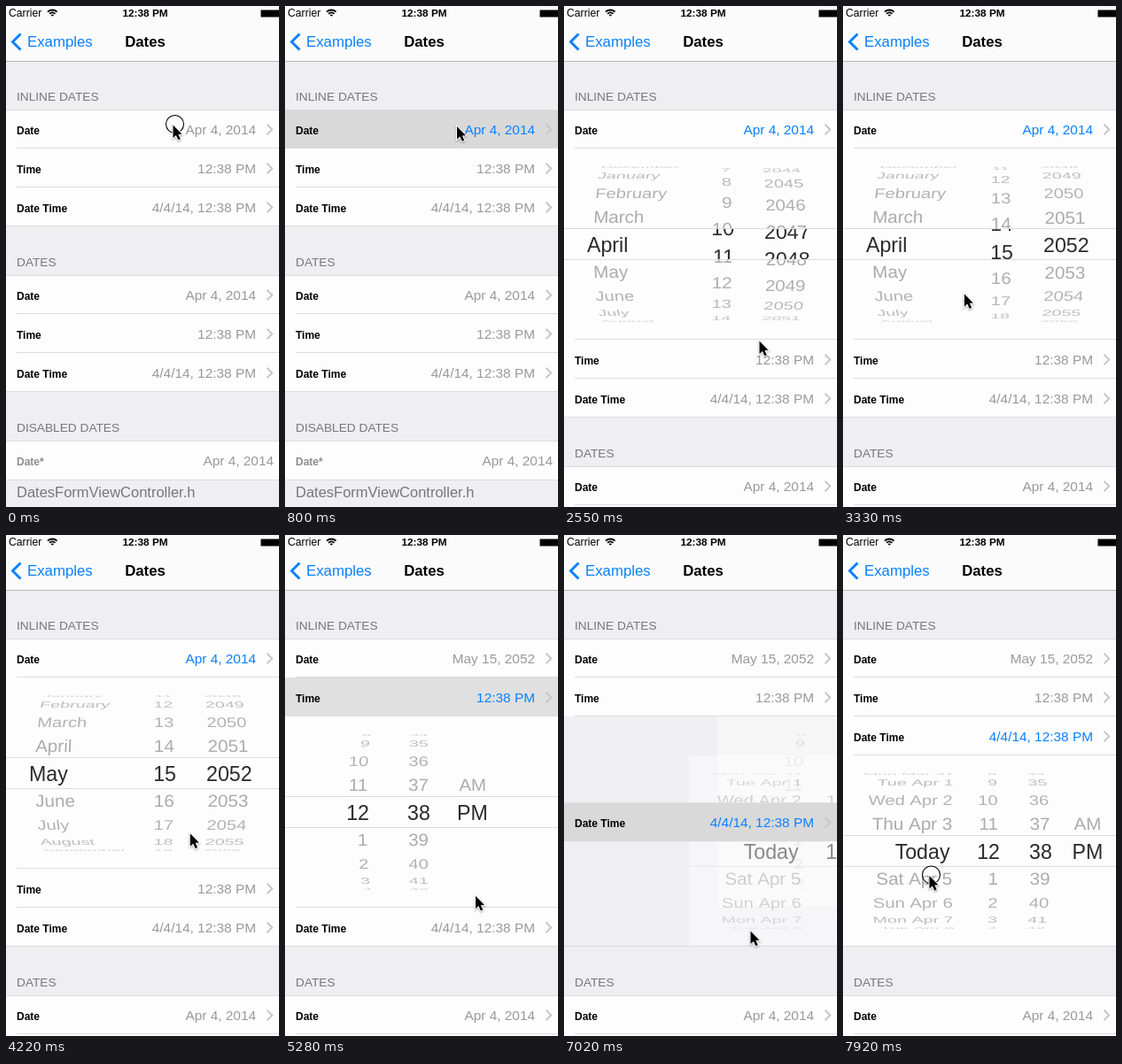
Recreate the animation shown at these times as an HTML page with a canvas. Size 308x566 px, loop 8 s.

```html
<!DOCTYPE html>
<html lang="en">
<head>
<meta charset="utf-8">
<title>Dates</title>
<style>
  html, body { margin: 0; width: 100%; height: 100%; overflow: hidden; background: #efeff2; }
  canvas { display: block; }
</style>
</head>
<body>
<canvas id="stage" width="308" height="566"></canvas>
<script>
const ctx = document.getElementById('stage').getContext('2d');
const LOOP = 8000, W = 308, H = 566, MID = 157, SCREEN = 320, LEFT = -3;
const BLUE = '#0a80ff', GREY = '#999', LINE = '#dcdcde', CELL = '#fdfdfd', BACK = '#efeff2';
const ROW = 44, PICKER = 216, TOP = 117, SECTION = 187;

const clamp = v => Math.max(0, Math.min(1, v));
const part = (t, from, to) => clamp((t - from) / (to - from));
const smooth = q => q * q * (3 - 2 * q);
const glide = q => 1 - (1 - q) ** 3;
const mix = (a, b, q) => a + (b - a) * q;
const wrap = (n, size) => (n % size + size) % size;

function text(str, x, y, size, color, align = 'left', weight = '') {
  ctx.font = `${weight} ${size}px "Liberation Sans", Arial, sans-serif`;
  ctx.textAlign = align;
  ctx.fillStyle = color;
  ctx.fillText(str, x, y);
}

function box(x, y, w, h, color) {
  ctx.fillStyle = color;
  ctx.fillRect(x, y, w, h);
}

// An angle bracket with its tip at x, y; a negative size points left
function chevron(x, y, size, color, width) {
  ctx.beginPath();
  ctx.moveTo(x - size, y - Math.abs(size));
  ctx.lineTo(x, y);
  ctx.lineTo(x - size, y + Math.abs(size));
  ctx.strokeStyle = color;
  ctx.lineWidth = width;
  ctx.stroke();
}

// Labels of the wheel rows
const MONTHS = ['January', 'February', 'March', 'April', 'May', 'June', 'July',
  'August', 'September', 'October', 'November', 'December'];
const WEEKDAYS = ['Mon', 'Tue', 'Wed', 'Thu', 'Fri', 'Sat', 'Sun'];
const month = n => MONTHS[wrap(n, 12)];
const date = n => wrap(n - 1, 31) + 1;
const year = n => n;
const hour = n => wrap(n - 1, 12) + 1;
const minute = n => String(wrap(n, 60)).padStart(2, '0');
const half = n => ['AM', 'PM'][n];
const day = n => n === 4 ? 'Today'
  : WEEKDAYS[wrap(n, 7)] + (n > 0 ? ` Apr ${n}` : ` Mar ${31 + n}`);

// A column holds its value, or spins by some rows between two times
const still = value => () => value;
const spin = (value, rows, from, to) => t => value + rows * glide(part(t, from, to));
const column = (label, align, x, chosenX, value) => ({ label, align, x, chosenX, value });
const PICKERS = [
  [
    column(month, 'left', 32.5, 26, spin(3, 1, 3520, 3950)),
    column(date, 'right', 190, 192, spin(4, 11, 2100, 3820)),
    column(year, 'left', 228, 226, spin(2014, 38, 1590, 3480))
  ],
  [
    column(hour, 'right', 93, 95, still(12)),
    column(minute, 'left', 139, 138, still(38)),
    column(half, 'left', 196.5, 194, still(1))
  ],
  [
    column(day, 'right', 123, 120.5, still(4)),
    column(hour, 'right', 175, 177, still(12)),
    column(minute, 'left', 211, 210, still(38)),
    column(half, 'left', 261, 258.5, still(1))
  ]
];

// Rows lie on a cylinder seen in weak perspective; the middle band magnifies them
const RADIUS = 88, STEP = 0.36, DEPTH = 950, BAND = 17;

function wheelRow(str, c, a, cy, chosen) {
  const cos = Math.cos(a), sin = Math.sin(a);
  const scale = 1 / (1 + RADIUS * (1 - cos) / DEPTH);
  const dx = (chosen ? c.chosenX : c.x) - MID;
  const size = chosen ? 23.2 : 20.7;
  const color = chosen ? '#2b2b2b' : `rgba(0,0,0,${0.18 + 0.15 * cos})`;
  ctx.save();
  ctx.transform(scale, 0, -dx * sin / DEPTH, cos, MID + dx * scale, cy + RADIUS * sin);
  text(str, 0, size * 0.37, size, color, c.align);
  ctx.restore();
}

function wheels(columns, cy, t, chosen) {
  ctx.save();
  ctx.beginPath();
  if (chosen) ctx.rect(LEFT, cy - BAND, SCREEN, 2 * BAND);
  else for (const y of [cy - RADIUS, cy + BAND]) ctx.rect(LEFT, y, SCREEN, RADIUS - BAND);
  ctx.clip();
  for (const c of columns) {
    const value = c.value(t), near = Math.round(value);
    for (let n = near - 4; n <= near + 4; n++) {
      const a = (n - value) * STEP, str = c.label(n);
      if (str !== undefined && Math.abs(a) < 1.5) wheelRow(str, c, a, cy, chosen);
    }
  }
  ctx.restore();
}

function picker(index, shown, t) {
  if (index < 0 || shown <= 0) return;
  const y = TOP + ROW * (index + 1), cy = y + PICKER / 2;
  ctx.save();
  ctx.globalAlpha = shown;
  ctx.translate(SCREEN * (1 - shown), 0);
  box(LEFT, y, SCREEN, PICKER, CELL);
  wheels(PICKERS[index], cy, t, false);
  wheels(PICKERS[index], cy, t, true);
  box(LEFT, cy - BAND - 1, SCREEN, 1, LINE);
  box(LEFT, cy + BAND, SCREEN, 1, LINE);
  box(12, y + PICKER - 1, SCREEN, 1, LINE);
  ctx.restore();
}

function row(y, label, value, color, glow = 0) {
  box(0, y, W, ROW, CELL);
  box(0, y, W, ROW, `rgba(217,217,217,${glow})`);
  box(12, y + ROW - 1, W, 1, LINE);
  text(label, 12, y + 28, 12, '#000', 'left', 'bold');
  text(value, 282, y + 28, 15.4, color, 'right');
  chevron(300.2, y + 22.5, 5.7, '#c7c7cc', 2);
}

function header(str, y) {
  text(str, 12, y - 10, 13.7, '#77777c');
  box(0, y, W, 1, LINE);
}

const LABELS = ['Date', 'Time', 'Date Time'];
const VALUES = ['Apr 4, 2014', '12:38 PM', '4/4/14, 12:38 PM'];
const TAPS = [710, 4830, 6770];

function table(t) {
  const open = TAPS.filter(tap => t >= tap).length - 1, before = open - 1;
  const since = open < 0 ? 0 : t - TAPS[open];
  const p = smooth(part(since, 90, 390));
  const glow = open < 0 ? 0 : 1 - part(since, 390, 650);
  const push = (state, i) => state >= 0 && i > state ? PICKER : 0;
  const shift = i => mix(push(before, i), push(open, i), p);

  picker(before, 1 - p, t);
  picker(open, p, t);
  LABELS.forEach((label, i) => {
    const value = i === 0 && t >= 4310 ? 'May 15, 2052' : VALUES[i];
    const chosen = i === open;
    row(TOP + ROW * i + shift(i), label, value, chosen ? BLUE : GREY, chosen ? glow : 0);
  });
  header('INLINE DATES', TOP);

  const second = TOP + SECTION + shift(3), third = second + SECTION;
  LABELS.forEach((label, i) => row(second + ROW * i, label, VALUES[i], GREY));
  header('DATES', second);

  box(0, third, W, ROW, CELL);
  header('DISABLED DATES', third);
  text('Date*', 12, third + 28, 12, '#8c8c8c', 'left', 'bold');
  text(VALUES[0], 302, third + 28, 15.4, GREY, 'right');
  text('DatesFormViewController.h', 12, third + 64, 16.5, '#77777c');
  for (const y of [second, third, third + 100]) box(0, y - 56, W, 1, LINE);
}

function bars() {
  box(0, 0, W, 62, '#fbfbfb');
  box(0, 62, W, 1, '#b9b9bc');
  text('Carrier', 3, 12, 12.2, '#000');
  text('12:38 PM', MID, 12, 11.8, '#000', 'center', 'bold');
  for (const r of [1.5, 4.5, 7.5]) {
    ctx.beginPath();
    ctx.arc(52.3, 12, r, -Math.PI * 0.75, -Math.PI * 0.25);
    ctx.lineWidth = 1.9;
    ctx.strokeStyle = '#000';
    ctx.stroke();
  }
  box(287.5, 4.5, 21, 8, '#000');
  chevron(7.5, 40.5, -9, BLUE, 2.9);
  text('Examples', 24, 46, 16.8, BLUE);
  text('Dates', MID, 46, 16.8, '#000', 'center', 'bold');
}

// Pointer stops: it sets off late enough to arrive on time; hold keeps it pressed to the next stop
const TRAVEL = 500;
const stop = (time, x, y, hold = false) => ({ time, x, y, hold });
const STOPS = [
  stop(0, 188.5, 134.5, true), stop(350, 194, 136),
  stop(1500, 248.5, 301.5, true), stop(1830, 238, 80),
  stop(2050, 180, 300, true), stop(2260, 179, 190),
  stop(2550, 220.5, 378.5), stop(3250, 155, 330),
  stop(3500, 80, 310, true), stop(3720, 82, 278),
  stop(4130, 207.5, 334.5), stop(4660, 214.5, 404.5),
  stop(5620, 216.5, 417.5), stop(6320, 210.5, 447.5),
  stop(7650, 166, 408), stop(7900, 97.5, 385, true)
];

function arrow() {
  ctx.beginPath();
  for (const [x, y] of [[0, 0], [0, 14.5], [3.4, 11.4], [5.8, 16.8], [8.3, 15.7], [5.9, 10.5], [10, 10.3]])
    ctx.lineTo(x, y);
  ctx.closePath();
  ctx.strokeStyle = '#fff';
  ctx.lineWidth = 2;
  ctx.shadowColor = 'rgba(0,0,0,.35)';
  ctx.shadowBlur = 2;
  ctx.shadowOffsetY = 1;
  ctx.stroke();
  ctx.shadowColor = 'transparent';
  ctx.fillStyle = '#000';
  ctx.fill();
}

function pointer(t) {
  const i = STOPS.findLastIndex(s => s.time <= t);
  const a = STOPS[i], b = STOPS[i + 1] ?? a;
  const q = b === a ? 0 : smooth(part(t, Math.max(a.time, b.time - TRAVEL), b.time));
  ctx.save();
  ctx.translate(mix(a.x, b.x, q), mix(a.y, b.y, q));
  if (a.hold || TAPS.some(tap => t >= tap && t < tap + 80)) {
    ctx.beginPath();
    ctx.arc(2, -1, 10, 0, Math.PI * 2);
    ctx.strokeStyle = '#000';
    ctx.lineWidth = 1.1;
    ctx.stroke();
  }
  arrow();
  ctx.restore();
}

function draw(t) {
  box(0, 0, W, H, BACK);
  table(t);
  bars();
  pointer(t);
}

let start;
function frame(now) {
  start ??= now;
  draw((now - start) % LOOP);
  requestAnimationFrame(frame);
}
draw(0);
requestAnimationFrame(frame);
</script>
</body>
</html>
```
